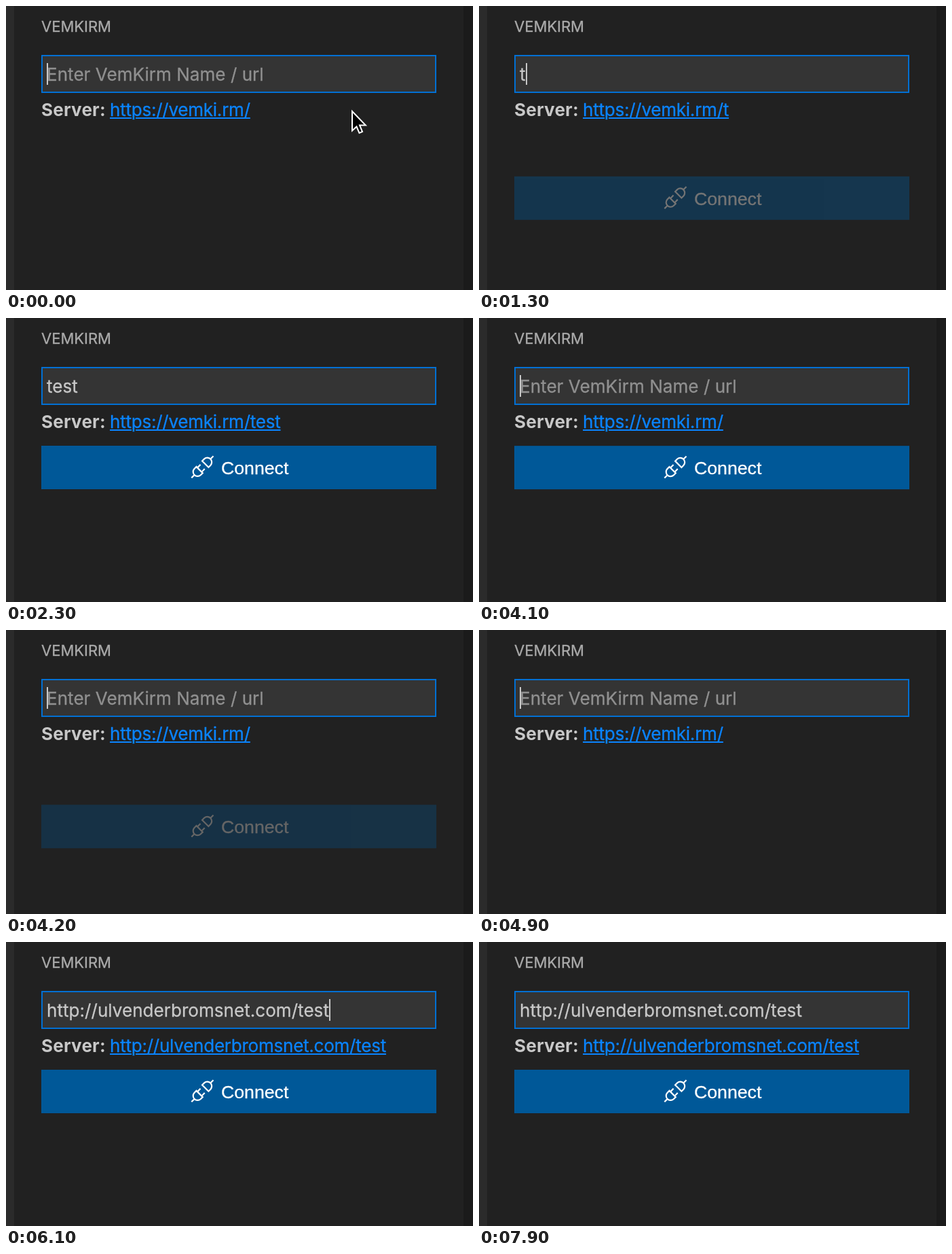
Animation of 688x418 px, one loop 8000 ms. Source, as an HTML page:

```html
<!DOCTYPE html>
<html lang="en">
<head>
<meta charset="utf-8">
<style>
  html, body { margin: 0; width: 100%; height: 100%; overflow: hidden; background: #212121; }
  body { position: relative; font: 26px/32px Inter, "Open Sans", sans-serif; color: #c8c8c8;
         font-variant-ligatures: no-contextual; -webkit-text-stroke: .3px currentColor; }
  body * { position: absolute; box-sizing: border-box; white-space: pre; }
  .edge { top: 0; height: 418px; }
  #title { left: 52px; top: 17px; font-size: 22px; line-height: 26px; color: #ababab; }
  #input { left: 52px; top: 72px; width: 582px; height: 56px; background: #343434;
           border: 2px solid #0070d4; letter-spacing: .05px; }
  #hint, #value { left: 6px; top: 11px; }
  #hint { color: #909090; }
  #caret { left: 100%; top: -1px; width: 2px; height: 32px; background: #c8c8c8; }
  #label { left: 52px; top: 137px; font-weight: 700; letter-spacing: .2px; -webkit-text-stroke: 0; }
  #link { left: 153px; top: 137px; color: #0a84ff; letter-spacing: -.23px;
          text-decoration: underline 2px; text-underline-offset: 2px; }
  #button { left: 52px; top: 188px; width: 582px; height: 64px; background: #005898; color: #fff;
            font: 26.67px/64px "Liberation Sans", Arial, sans-serif; }
  #button span { left: 265px; top: 1px; }
  #button svg { left: 217.5px; top: 12px; }
  #pointer { left: 500px; top: 145px; }
</style>
</head>
<body>
<div class="edge" style="left:0;width:12px;background:#2b2b2b"></div>
<div class="edge" style="left:674px;width:14px;background:#1b1b1b"></div>
<div id="title">VEMKIRM</div>
<div id="input">
  <div id="hint">Enter VemKirm Name / url</div>
  <div id="value"><span id="text" style="position:static"></span><i id="caret"></i></div>
</div>
<div id="label">Server:</div>
<div id="link"></div>
<div id="button">
  <svg width="40" height="40" viewBox="0 0 16 16" fill="none" stroke="#fff" stroke-width=".87">
    <path d="M7.62 4.19L11.33 7.9 12.57 6.66A2.63 2.63 0 0 0 8.85 2.95ZM12.7 2.8L14.2 1.3
             M4.19 7.55L7.9 11.26 6.66 12.5A2.63 2.63 0 0 1 2.95 8.78ZM2.8 12.65L1.3 14.14
             M5.1 7.85L6.6 6.3M7.6 10.35L9.08 8.78"/>
  </svg>
  <span>Connect</span>
</div>
<svg id="pointer" width="40" height="50">
  <path d="M10 10V38.5L16.5 32.5 20.5 42 25 40 21 30.5H29.8Z" fill="#000" stroke="#fff" stroke-width="2"/>
</svg>
<script>
const LOOP = 8000, STEP = 100;
const HOST = "https://vemki.rm/", OTHER = "http://ulvenderbromsnet.com/test";

// [time, input value]
const edits = [[0, ""], [1300, "t"], [1500, "te"], [1600, "tes"], [1800, "test"],
               [3700, "te"], [3800, ""], [5100, OTHER]];
// [caret on, caret off]
const blinks = [[0, 200], [700, 1200], [1300, 2300], [2800, 3300], [3700, 4300],
                [4800, 5600], [6100, 6600], [7100, 7600]];
// [button enters, button leaves]
const visits = [[1277, 4085], [5077, Infinity]];
const ENTER = 160, LEAVE = 130, RISE = 100;

const $ = id => document.getElementById(id);
const show = (el, on) => el.style.visibility = on ? "visible" : "hidden";
const clamp = x => Math.min(1, Math.max(0, x));
const cubicOut = x => 1 - (1 - x) ** 3;

function presence(t) {
  return Math.max(...visits.map(([from, to]) =>
    cubicOut(Math.min(clamp((t - from) / ENTER), clamp(1 - (t - to) / LEAVE)))));
}

function draw(t) {
  const value = edits.filter(([at]) => at <= t).pop()[1];
  $("text").textContent = value;
  $("link").textContent = value.startsWith("http") ? value : HOST + value;
  show($("hint"), !value);
  show($("caret"), blinks.some(([on, off]) => t >= on && t < off));
  show($("pointer"), t < 100);

  const p = presence(t);
  $("button").style.opacity = p;
  $("button").style.transform = `translateY(${(1 - p) * RISE}px)`;
}

const start = performance.now();
function tick() {
  const t = (performance.now() - start) % LOOP;
  draw(Math.floor(t / STEP) * STEP);
  requestAnimationFrame(tick);
}
tick();
</script>
</body>
</html>
```
